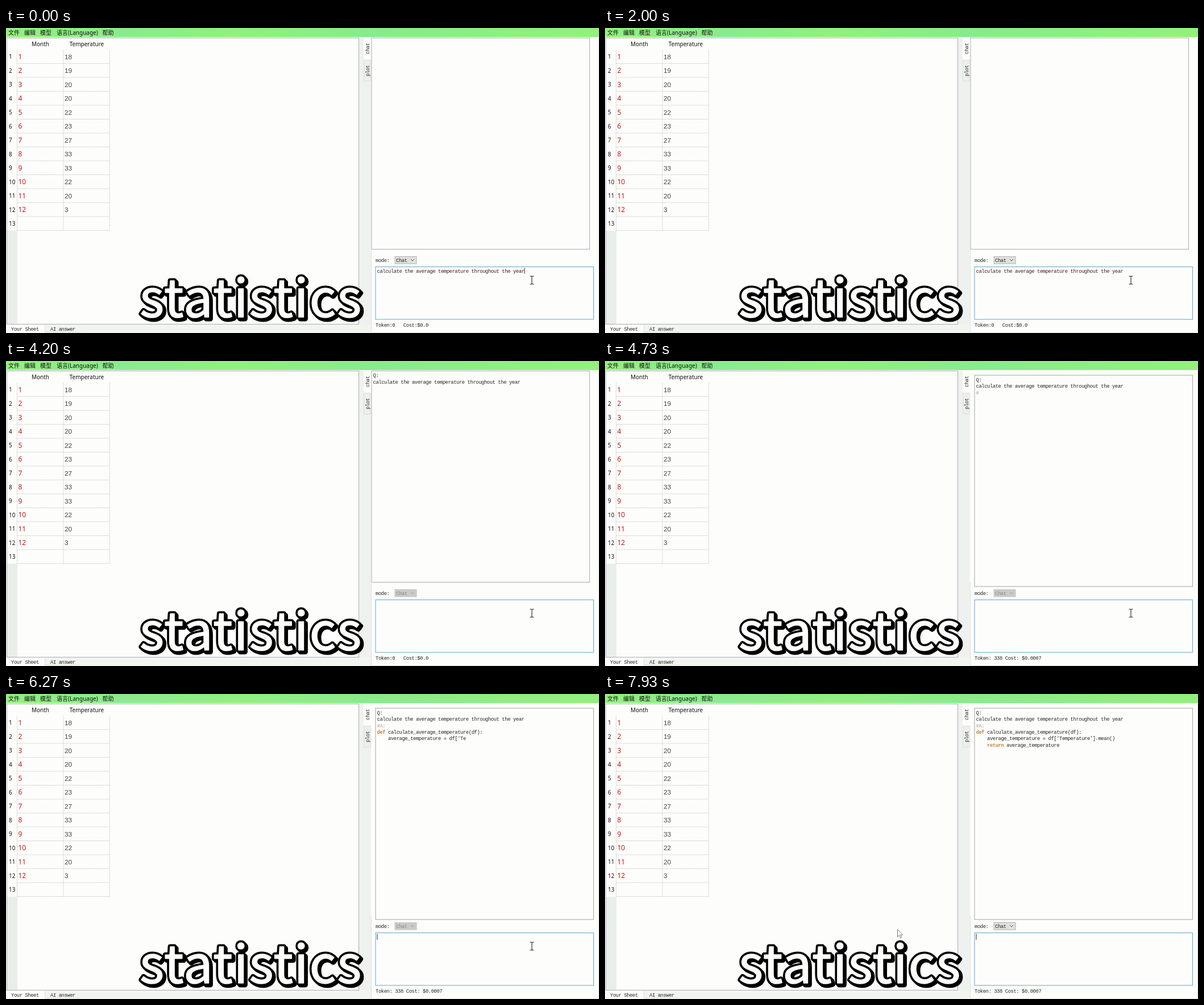
These frames come from a looping animation (1043 by 537 pixels, 8 s). An HTML page:

```html
<!DOCTYPE html>
<html lang="en">
<head>
<meta charset="utf-8">
<title>Spreadsheet assistant</title>
<style>
  html, body { margin: 0; width: 100%; height: 100%; overflow: hidden; background: #fdfdfb; }
  svg { display: block; width: 100vw; height: 100vh; }
  text { white-space: pre; }
  .ui { font: 10px "Noto Sans", "Noto Sans CJK SC", sans-serif; fill: #111; }
  .red { font-size: 12px; font-weight: 500; fill: #c4161c; }
  .cell { font: 11.8px "Liberation Sans", sans-serif; fill: #444; }
  .mono { font: 8.9px "Liberation Mono", monospace; letter-spacing: -.44px; fill: #262626; }
  .word { fill: #c8833c; font-weight: bold; }
  .note { fill: #999; }
  .title { font: 92px "Noto Sans CJK SC", "Noto Sans", sans-serif; letter-spacing: 1.7px; text-anchor: middle; stroke-linejoin: round; }
</style>
</head>
<body>
<svg viewBox="0 0 1043 537">
  <defs>
    <linearGradient id="bar">
      <stop offset="0" stop-color="#93f07e"/>
      <stop offset=".2" stop-color="#8bea8f"/>
      <stop offset=".38" stop-color="#92ef80"/>
      <stop offset=".62" stop-color="#8aea8c"/>
      <stop offset="1" stop-color="#93f07e"/>
    </linearGradient>
  </defs>

  <rect width="1043" height="537" fill="#fdfdfb"/>
  <rect x="621" y="17" width="21" height="520" fill="#eff1ee"/>
  <rect x="629" y="17" width="13" height="40" fill="#fdfdfa"/>
  <rect x="629.5" y="56.5" width="12" height="37" fill="#ecefea" stroke="#dcdfda"/>
  <rect y="522" width="642" height="15" fill="#f2f4f0"/>
  <rect y="522" width="68" height="15" fill="#fdfdfb"/>
  <path d="M69 535.5H131M68.5 523V536" stroke="#dde2dc"/>
  <rect x="2" y="357" width="18" height="164" fill="#e9eeea"/>
  <rect x="1.5" y="17.5" width="619" height="504" fill="none" stroke="#a9adb8"/>
  <path d="M642.5 390V536.5H1042.5V17" fill="none" stroke="#dbe2e6"/>
  <rect width="1043" height="16" fill="url(#bar)"/>
  <g id="sheet"></g>

  <rect id="log" width="383.5" height="372" fill="none"/>
  <g id="chat"></g>
  <rect id="combo" x="684" y="402.5" width="38" height="12.5"/>
  <g id="mode">
    <text class="mono" x="686" y="411.5">Chat</text>
    <path d="M712 407l3 3 3-3" fill="none" stroke="#555"/>
  </g>
  <rect x="650" y="420.5" width="383.5" height="92.5" fill="#fdfdfc" stroke="#5ca5d0"/>
  <text id="input" class="mono" x="652.5" y="431"></text>
  <path id="caret" stroke="#222"/>
  <text id="cost" class="mono" x="650" y="526"></text>

  <g class="title">
    <text x="434" y="512" stroke="#000" stroke-width="9">statistics</text>
    <text x="431" y="508.5" stroke="#000" stroke-width="9">statistics</text>
    <text x="431" y="508.5" fill="#fdfdfc" stroke="#fdfdfc" stroke-width="1.6">statistics</text>
  </g>

  <path id="beam" d="M-3.5 -7h2.5l1 1 1-1h2.5M0 -6V6M-3.5 7h2.5l1-1 1 1h2.5" fill="none" stroke="#222" stroke-width="1.1"/>
  <path id="arrow" d="M0 0V13l3-2.8 2 5 2.2-.9-2-4.8H9.2Z" fill="#fff" stroke="#777"/>
</svg>
<script>
const $ = id => document.getElementById(id);
const label = (cls, x, y, s, more = '') => `<text class="${cls}" x="${x}" y="${y}" ${more}>${s}</text>`;
const set = (id, attrs) => { for (const k in attrs) $(id).setAttribute(k, attrs[k]); };
const show = (id, on) => $(id).style.display = on ? '' : 'none';

const LOOP = 8000, SEND = 2170, REPLY = 4600, TYPE = 4726, BLINK = 339, PITCH = 24.5;
const question = 'calculate the average temperature throughout the year';
const answer = `#A:
def calculate_average_temperature(df):
    average_temperature = df['Temperature'].mean()
    return average_temperature`;

function drawSheet() {
  const temps = [18, 19, 20, 20, 22, 23, 27, 33, 33, 22, 20, 3];
  let out = '', lines = 'M19.5 357V38M101 357V38M182.5 357V38';
  for (let i = 0; i < 13; i++) {
    const y = 54.2 + i * PITCH;
    out += label('ui', 5, y, i + 1);
    lines += `M20 ${62.5 + i * PITCH}H182`;
    if (i < 12) out += label('ui red', 21.5, y + .6, i + 1) + label('cell', 103, y + .4, temps[i]);
  }
  const menu = [[4, '文件'], [32, '编辑'], [60, '模型'], [89, '语言(Language)'], [169.5, '帮助']];
  for (const [x, s] of menu) out += label('ui', x, 12, s);
  out += label('ui', 60.5, 32, 'Month', 'text-anchor="middle"')
    + label('ui', 142, 32, 'Temperature', 'text-anchor="middle"')
    + label('mono', 9, 533, 'Your Sheet') + label('mono', 78, 533, 'AI answer')
    + label('mono', 650, 411.5, 'mode:')
    + label('mono', 0, 0, 'chat', 'transform="translate(639 46) rotate(-90)"')
    + label('mono', 0, 0, 'plot', 'transform="translate(639 85) rotate(-90)"');
  $('sheet').innerHTML = `<path d="${lines}" fill="none" stroke="#d3d5d0" stroke-dasharray="2 .6"/>` + out;
}

const paint = s => s
  .replace(/^#.*/, '<tspan class="note">$&</tspan>')
  .replace(/^def|^ +return/, '<tspan class="word">$&</tspan>');

function draw(t) {
  const sent = t >= SEND, replied = t >= REPLY;
  const x = replied ? 650 : 643, y = replied ? 25 : 17.5;
  const typed = t < TYPE ? 0 : Math.floor(1.2 + (t - TYPE) * .0478);
  const busy = sent && typed < answer.length;

  set('log', { x, y, stroke: replied ? '#a3a69a' : '#a9adb8' });
  const lines = sent ? ['Q:', question, ...answer.slice(0, typed).split('\n').map(paint)] : [];
  $('chat').innerHTML = lines.map((s, i) => label('mono', x + 2.5, y + 10.6 + i * 11.45, s)).join('');

  set('combo', { fill: busy ? '#cbcbc9' : '#e1e2dc', stroke: busy ? '#c3c3c1' : '#aeb0aa' });
  $('mode').style.opacity = busy ? .4 : 1;
  $('input').textContent = sent ? '' : question;
  $('cost').textContent = replied ? 'Token: 338 Cost: $0.0007' : 'Token:0   Cost:$0.0';

  const phase = Math.floor((t - (sent ? SEND : 320 - BLINK)) / BLINK);
  show('caret', phase % 2 === 0);
  set('caret', { d: `M${sent ? 653 : 912} 422.5v10` });

  const p = Math.min(1, Math.max(0, (t - 7330) / 590));
  const e = p * p * (3 - 2 * p);
  const cx = 925 - 410.5 * e, cy = 444 - 29.5 * e;
  const inBox = cx > 650;
  show('beam', inBox);
  show('arrow', !inBox);
  set(inBox ? 'beam' : 'arrow', { transform: `translate(${cx} ${cy})` });
}

drawSheet();
const start = performance.now();
(function tick() {
  draw((performance.now() - start) % LOOP);
  requestAnimationFrame(tick);
})();
</script>
</body>
</html>
```
